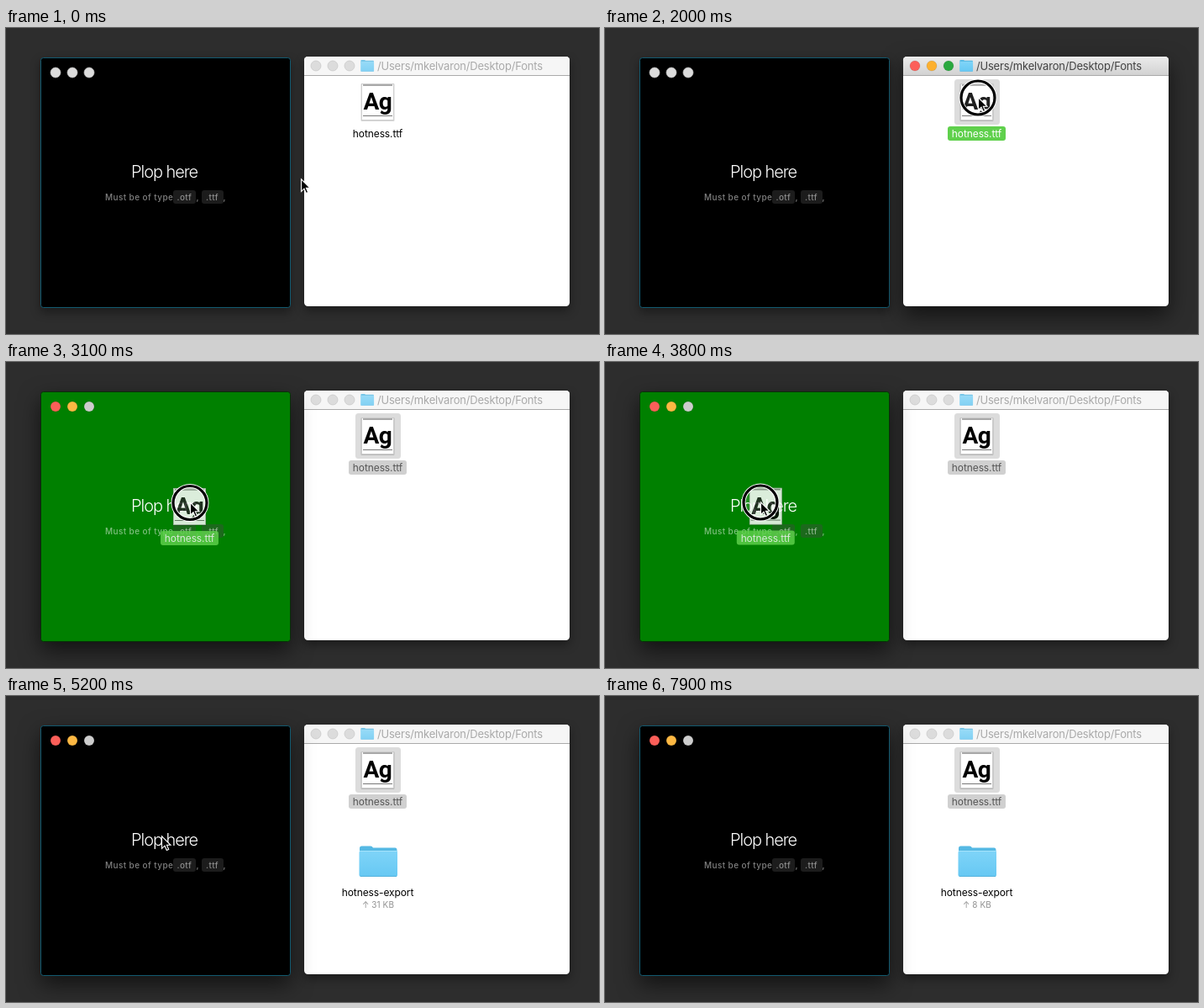
An HTML page for the animation above (8000 ms loop, 706 by 364 pixels).

```html
<!DOCTYPE html>
<html lang="en">
<head>
<meta charset="utf-8">
<title>Drop a font</title>
<style>
html, body { margin: 0; width: 100%; height: 100%; overflow: hidden; background: #2d2d2d; }
svg { display: block; width: 706px; height: 364px; }
text { font: 12px Inter, sans-serif; letter-spacing: -.1px; white-space: pre; }
.mid { text-anchor: middle; }
.window { filter: drop-shadow(0 5px 6px rgba(0,0,0,.4)); }
.window.active { filter: drop-shadow(0 10px 13px rgba(0,0,0,.6)); }
.light { fill: #dcdcdc; stroke: #c6c6c6; stroke-width: .7; }
.active .light { fill: var(--on); stroke: rgba(0,0,0,.15); }

#pane { fill: #000; stroke: #125a70; }
.over #pane { fill: #008000; stroke: #063206; }
.heading { font-size: 20px; font-weight: 300; letter-spacing: -1.05px; fill: #fff; }
.hint { font-size: 10px; font-weight: 500; letter-spacing: .4px; fill: rgba(255,255,255,.5); }
.pill { fill: rgba(70,70,70,.4); }

.bar { fill: #f6f6f6; }
.active .bar { fill: url(#chrome); }
.title { font-size: 13px; letter-spacing: -.2px; fill: #a9a9a9; }
.active .title { fill: #434343; }
.titleFolder { opacity: .8; }
.active .titleFolder { opacity: 1; }
.ag { font: bold 28px Roboto, sans-serif; letter-spacing: -.7px; }
.tile, .label { fill: none; }
.selected .tile { fill: #dcdcdc; }
.selected .label { fill: #d0d0d0; }
.selected .name { fill: #555; }
.active .selected .label, #ghost .label { fill: #5fd04c; }
.active .selected .name, #ghost .name { fill: #fff; }
.size { font-size: 10px; letter-spacing: .1px; fill: #929292; }
</style>
</head>
<body>
<svg viewBox="0 0 706 364">
  <defs>
    <linearGradient id="chrome" x2="0" y2="1">
      <stop stop-color="#ebebeb"/><stop offset="1" stop-color="#d2d2d2"/>
    </linearGradient>
    <linearGradient id="blue" x2="0" y2="1">
      <stop stop-color="#7fd4f8"/><stop offset="1" stop-color="#66c8f3"/>
    </linearGradient>
    <g id="fontIcon">
      <rect x="422.5" y="66" width="40" height="45" rx="1" fill="#000" opacity=".16"/>
      <rect x="423.5" y="66.5" width="38" height="43" fill="#fff" stroke="#c9c9c9" stroke-width=".8"/>
      <path d="M425 68H460" stroke="#8d8d8d" stroke-width="1.6"/>
      <path d="M425 104.500H460" stroke="#777"/>
      <text class="ag" x="425.500" y="97">Ag</text>
    </g>
    <g id="folderIcon">
      <path d="M421 181Q421 178.500 423.500 178.500H434Q436 178.500 437 180.500H463.500Q465.500 180.500 465.500 183V190H421Z" fill="#56b9e4"/>
      <rect x="420.500" y="184" width="45.500" height="31" rx="2" fill="url(#blue)"/>
      <path d="M421 184.500H465.500" stroke="#a5e3fb"/>
      <path d="M422 214.500H465" stroke="#52b2dc"/>
    </g>
  </defs>

  <rect width="706" height="364" fill="#2d2d2d"/>

  <g id="windows">
    <g id="plop" class="window">
      <rect id="pane" x="41.500" y="35.500" width="297" height="297" rx="3"/>
      <g class="lights" data-x="59" data-y="53" data-colors="#fc5f59 #fdb843 #cdcdcd"></g>
      <text class="heading" x="149" y="178">Plop here</text>
      <rect class="pill" x="199" y="193" width="27" height="16" rx="3"/>
      <rect class="pill" x="233" y="193" width="26" height="16" rx="3"/>
      <text class="hint" x="118" y="205">Must be of type</text>
      <text class="hint" x="203.500" y="205">.otf</text>
      <text class="hint" x="226.500" y="205">,</text>
      <text class="hint" x="238" y="205">.ttf</text>
      <text class="hint" x="258.500" y="205">,</text>
    </g>

    <g id="finder" class="window">
      <rect x="355" y="34" width="316" height="297" rx="4.500" fill="#fff"/>
      <path class="bar" d="M355 56V38.500Q355 34 359.500 34H666.500Q671 34 671 38.500V56Z"/>
      <path d="M355 56.500H671" stroke="#aaa"/>
      <g class="lights" data-x="369" data-y="45" data-colors="#fc5f59 #fdb02f #2aa83f"></g>
      <use class="titleFolder" href="#folderIcon" transform="translate(275 -28.500) scale(.35 .373)"/>
      <text class="title" x="442" y="50">/Users/mkelvaron/Desktop/Fonts</text>
      <g id="file">
        <rect class="tile" x="416" y="61" width="54" height="54" rx="3.500"/>
        <use href="#fontIcon"/>
        <rect class="label" x="408" y="117" width="69" height="17" rx="3"/>
        <text class="name mid" x="442.500" y="130">hotness.ttf</text>
      </g>
      <g id="exported">
        <use href="#folderIcon"/>
        <text class="mid" x="442.500" y="238">hotness-export</text>
        <text id="size" class="size mid" x="443" y="252"></text>
      </g>
    </g>
  </g>

  <g id="ghost" opacity=".84">
    <use href="#fontIcon"/>
    <rect class="label" x="408" y="117" width="69" height="17" rx="3"/>
    <text class="name mid" x="442.500" y="130">hotness.ttf</text>
  </g>

  <g id="pointer">
    <g id="ring" fill="none">
      <circle r="18" cy="1" fill="#fff" fill-opacity=".12"/>
      <circle r="20" cy="1" stroke="#fff" stroke-width="5"/>
      <circle r="20" cy="1" stroke="#000" stroke-width="3.200"/>
    </g>
    <path d="M.5 .8V15.500L4 12.200 6.300 17.500 8.700 16.500 6.400 11.300H11Z" fill="#000" stroke="#fff" stroke-width="1.100"/>
  </g>
</svg>

<script>
const LOOP = 8000, STEP = 100;
const el = id => document.getElementById(id);
const [windows, plop, finder, file, exported, size, ghost, pointer, ring] =
  ['windows', 'plop', 'finder', 'file', 'exported', 'size', 'ghost', 'pointer', 'ring'].map(el);

// time, x, y of the pointer tip
const path = [
  [0, 351, 179], [500, 351, 179], [700, 366, 163], [900, 407, 121], [1100, 439, 87],
  [1200, 444, 82], [2200, 444, 82], [2300, 434, 98], [2400, 414, 136], [2500, 385, 165],
  [2600, 346, 168], [2700, 300, 168], [2800, 255, 168], [2900, 228, 167], [3000, 219, 166.5],
  [3300, 219, 166.5], [3800, 185, 166]
];
const PRESS = 1300, DRAG = 2300, ENTER = 2700, RELEASE = 3900, CLEAR = 4100;
const EXPORTED = 5000, SETTLED = 7700;

for (const group of document.querySelectorAll('.lights')) {
  const { x, y, colors } = group.dataset;
  group.innerHTML = colors.split(' ').map((color, i) =>
    `<circle class="light" cx="${+x + 20 * i}" cy="${y}" r="6" style="--on:${color}"/>`).join('');
}

function position(t) {
  const next = path.findIndex(point => point[0] > t);
  if (next < 0) return path.at(-1).slice(1);
  const [t0, x0, y0] = path[next - 1], [t1, x1, y1] = path[next];
  const k = (t - t0) / (t1 - t0);
  return [x0 + (x1 - x0) * k, y0 + (y1 - y0) * k];
}

const show = (node, visible) => node.style.display = visible ? '' : 'none';
const between = (t, from, to) => t >= from && t < to;

function render(t) {
  const [x, y] = position(t);
  pointer.setAttribute('transform', `translate(${x} ${y})`);
  show(pointer, t < SETTLED);
  show(ring, between(t, PRESS, RELEASE));

  // the dragged copy trails the pointer by one step
  const [gx, gy] = position(Math.max(0, t - STEP));
  ghost.setAttribute('transform', `translate(${gx - 443} ${gy - 82.5})`);
  show(ghost, between(t, DRAG, RELEASE));

  plop.classList.toggle('active', t >= ENTER);
  plop.classList.toggle('over', between(t, ENTER, CLEAR));
  finder.classList.toggle('active', between(t, PRESS, ENTER));
  file.classList.toggle('selected', t >= PRESS);
  const front = t >= ENTER ? plop : finder;
  if (windows.lastElementChild !== front) windows.append(front);

  show(exported, t >= EXPORTED);
  size.textContent = t < SETTLED ? '↑ 31 KB' : '↑ 8 KB';
}

const start = performance.now();
function frame() {
  const t = (performance.now() - start) % LOOP;
  render(Math.floor(t / STEP) * STEP);
  requestAnimationFrame(frame);
}
frame();
</script>
</body>
</html>
```
